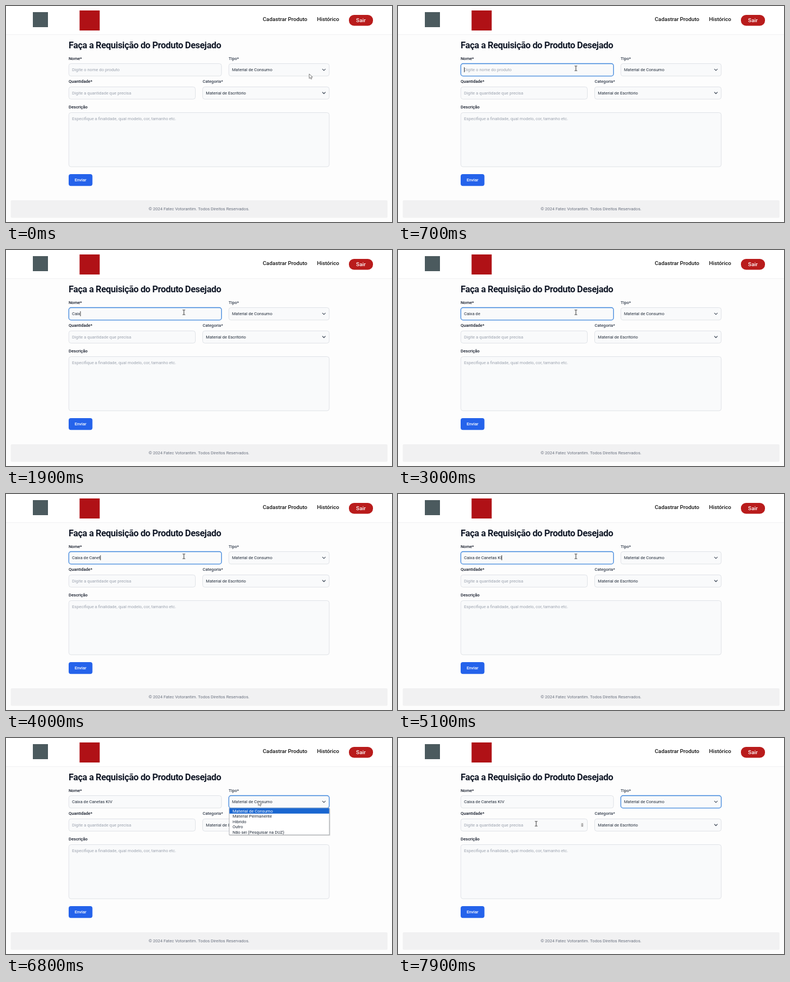
An HTML page that plays this animation: 690 by 388 pixels, repeating every 8 s.

```html
<!DOCTYPE html>
<html lang="pt-BR">
<head>
<meta charset="utf-8">
<title>Requisição de produto</title>
<style>
  html, body { margin: 0; width: 100%; height: 100%; overflow: hidden; background: #fdfdfd; }
  svg { display: block; width: 100%; height: 100%; }
  text { font: 400 7.57px Roboto, sans-serif; fill: #1f2937; white-space: pre; }
  .title { font-size: 16.2px; font-weight: 700; letter-spacing: -.025em; fill: #111827; }
  .nav { font-size: 9.74px; font-weight: 500; fill: #111; }
  .label { font-weight: 500; fill: #111827; }
  .soft { fill: #374151; }
  .hint { fill: #9ca3af; }
  .light { fill: #fff; }
  .mid { text-anchor: middle; }
  .field { fill: #f9fafb; stroke: #d5d8de; stroke-width: .7; }
  .field.focus { stroke: #3f86dc; stroke-width: 1.3; }
  .chevron { fill: none; stroke: #4b5563; stroke-width: 1.2; stroke-linecap: round; stroke-linejoin: round; }
</style>
</head>
<body>
<svg viewBox="0 0 690 388">
  <rect width="690" height="51" fill="#fff"/>
  <rect y="51" width="690" height=".7" fill="#ececee"/>
  <rect x="48" y="11" width="27" height="27" fill="#4b5a5e"/>
  <rect x="131.500" y="8" width="36" height="36" fill="#b01116"/>
  <text class="nav" x="459" y="27">Cadastrar Produto</text>
  <text class="nav" x="556" y="27">Histórico</text>
  <rect x="613" y="16" width="43" height="19.500" rx="9" fill="#b91c1c"/>
  <text class="nav light mid" x="634.300" y="29.300">Sair</text>

  <text class="title" x="112" y="76">Faça a Requisição do Produto Desejado</text>

  <text class="label" x="112" y="96.500">Nome*</text>
  <rect id="nameField" class="field" x="112.300" y="103.500" width="273" height="22.300" rx="4"/>
  <text id="nameText" x="118" y="117.200"></text>
  <rect id="caret" y="110" width=".8" height="9" fill="#111"/>

  <text class="label soft" x="398" y="96.500">Tipo*</text>
  <rect id="typeField" class="field" x="398.300" y="103.500" width="179.500" height="22.300" rx="4"/>
  <text x="404" y="117.200">Material de Consumo</text>
  <path class="chevron" d="M565.800 113.400l2.500 2.500 2.500-2.500"/>

  <text class="label" x="112" y="138">Quantidade*</text>
  <rect class="field" x="112.300" y="145.300" width="226.200" height="22" rx="4"/>
  <text class="hint" x="118" y="158.900">Digite a quantidade que precisa</text>
  <g id="spinner">
    <rect x="326.500" y="152.200" width="5.600" height="8" fill="#ececec"/>
    <path d="M327.300 155.400l2-2.200 2 2.200zM327.300 157l2 2.200 2-2.200z" fill="#777"/>
  </g>

  <text class="label soft" x="351.500" y="138">Categoria*</text>
  <rect class="field" x="351.500" y="145.300" width="226.300" height="22" rx="4"/>
  <text x="357.300" y="158.900">Material de Escritório</text>
  <path class="chevron" d="M565.800 155l2.500 2.500 2.500-2.500"/>

  <text class="label" x="112" y="184.200">Descrição</text>
  <rect class="field" x="112.300" y="191.500" width="465.500" height="97.300" rx="4"/>
  <text class="hint" x="118" y="205">Especifique a finalidade, qual modelo, cor, tamanho etc.</text>

  <rect x="112" y="302" width="42.500" height="21.300" rx="4" fill="#2563eb"/>
  <text class="label light mid" x="133.300" y="315.300">Enviar</text>

  <rect x="8.500" y="349" width="673.500" height="31.500" rx="2" fill="#f1f1f2"/>
  <text class="mid" x="345" y="367.300" style="fill:#6b7280">© 2024 Fatec Votorantim. Todos Direitos Reservados.</text>

  <g id="suggestion">
    <path d="M165 130h7.500l4.500-4.500 4.500 4.500h70.500v23h-87z"/>
    <text class="light" x="171.500" y="142.400" style="font-size:6.300px">Tadeu Bévar</text>
  </g>

  <g id="menu">
    <rect x="399.500" y="127" width="180" height="48.500" fill="#000" opacity=".15"/>
    <rect x="399" y="126" width="179" height="48" fill="#fff" stroke="#8b8f96" stroke-width=".7"/>
    <rect x="399.300" y="126.200" width="178.400" height="9.600" fill="#1966d0"/>
  </g>

  <path id="arrow" d="M0 0v8.200l1.900-1.700 1.300 2.900 1.500-.7-1.300-2.800 2.700-.1z" fill="#fff" stroke="#444" stroke-width=".7" stroke-linejoin="round"/>
  <path id="beam" d="M-2.300-4.200h1.700l.6.500.6-.5h1.700M0-3.800v7.600M-2.300 4.200h1.700l.6-.5.6.5h1.700" fill="none" stroke="#222" stroke-width=".9"/>
</svg>
<script>
const LOOP = 8000, STEP = 100;
const [nameField, nameText, caret, typeField, spinner, suggestion, menu, arrow, beam] =
  ["nameField", "nameText", "caret", "typeField", "spinner", "suggestion", "menu", "arrow", "beam"]
    .map(id => document.getElementById(id));

const PHRASE = "Caixa de Canetas KIV";
const KEY_TIMES = [900, 1200, 1800, 1900, 2000, 2200, 2200, 2400, 2400, 3300,
  3500, 3600, 3700, 4000, 4200, 4400, 4400, 4900, 5100, 5400];
const NAME_FOCUS = 700, TYPE_FOCUS = 6800, MENU_CLOSE = 7500;

// time, x, y
const MOUSE = [
  [0, 542, 122], [600, 318, 112], [5800, 318, 112], [6200, 251, 160],
  [6300, 251, 160], [6700, 451, 113], [7200, 451, 113], [7450, 440, 131],
  [7650, 365, 168], [7900, 247, 154]
];

["Material de Consumo", "Material Permanente", "Híbrido", "Outro", "Não sei (Pesquisar na DUZ)"]
  .forEach((option, i) => {
    const row = document.createElementNS("http://www.w3.org/2000/svg", "text");
    row.textContent = option;
    row.setAttribute("x", 405);
    row.setAttribute("y", 133.7 + i * 9.45);
    if (i === 0) row.setAttribute("class", "light");
    menu.append(row);
  });

const show = (el, on) => { el.style.display = on ? "" : "none"; };
const inside = (x, y, left, top, right, bottom) => x > left && x < right && y > top && y < bottom;

function mouseAt(t) {
  const next = MOUSE.findIndex(p => p[0] > t);
  if (next < 0) return MOUSE.at(-1).slice(1);
  const [t0, x0, y0] = MOUSE[next - 1], [t1, x1, y1] = MOUSE[next];
  const p = (t - t0) / (t1 - t0), k = p * p * (3 - 2 * p);
  return [x0 + (x1 - x0) * k, y0 + (y1 - y0) * k];
}

function drawName(t) {
  const typed = KEY_TIMES.filter(k => k <= t).length;
  const focused = t >= NAME_FOCUS && t < TYPE_FOCUS;
  const lastInput = typed ? KEY_TIMES[typed - 1] : NAME_FOCUS;
  nameText.textContent = PHRASE.slice(0, typed);
  const width = typed ? nameText.getComputedTextLength() : 0;
  if (!typed) nameText.textContent = "Digite o nome do produto";
  nameText.classList.toggle("hint", !typed);
  nameField.classList.toggle("focus", focused);
  caret.setAttribute("x", 118 + width);
  show(caret, focused && (t - lastInput) % 1000 < 500);
  show(suggestion, t >= KEY_TIMES[0] && t < 1000);
}

function drawMouse(t) {
  const [x, y] = mouseAt(t);
  const overQuantity = inside(x, y, 112, 145, 339, 168);
  const overText = overQuantity || inside(x, y, 112, 103, 386, 126);
  for (const el of [arrow, beam]) el.setAttribute("transform", `translate(${x} ${y})`);
  show(beam, overText);
  show(arrow, !overText);
  show(spinner, overQuantity);
}

function render(now) {
  const t = Math.floor(now % LOOP / STEP) * STEP;
  drawName(t);
  typeField.classList.toggle("focus", t >= TYPE_FOCUS);
  show(menu, t >= TYPE_FOCUS && t < MENU_CLOSE);
  drawMouse(t);
}

const start = performance.now();
function tick() {
  render(performance.now() - start);
  requestAnimationFrame(tick);
}
tick();
</script>
</body>
</html>
```
